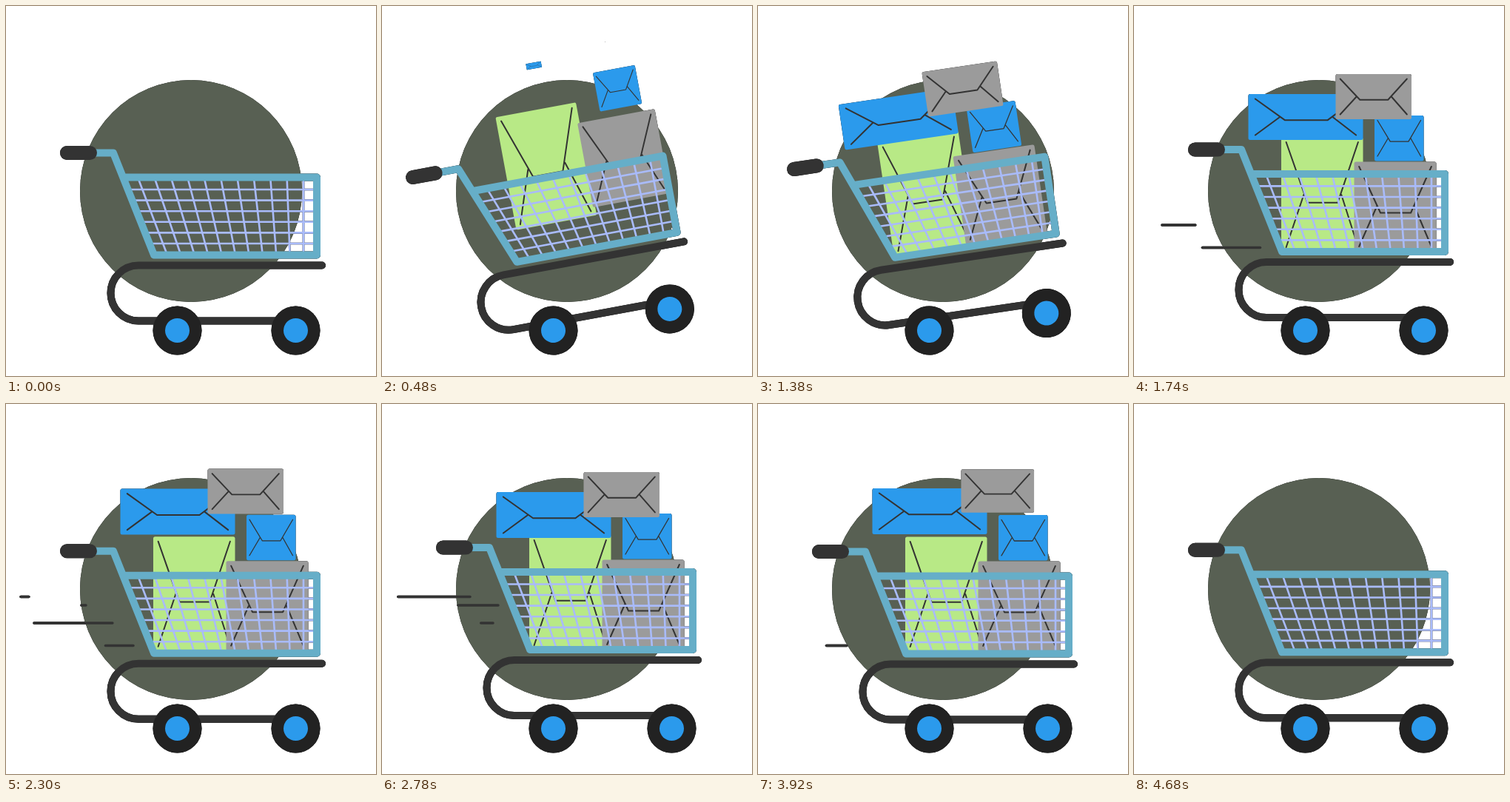
Animation, 500 px wide and 500 px high, one loop 4.7 s. Source, as an HTML page:

```html
<!DOCTYPE html>
<html lang="en">
<head>
<meta charset="utf-8">
<title>Shopping cart</title>
<style>
  html, body { margin: 0; width: 100%; height: 100%; overflow: hidden; background: #fff; }
  /* thin dark rim wherever the drawing meets the white page */
  svg { display: block; width: 100vw; height: 100vh; filter: drop-shadow(0 0 .5px #000); }
  path, line { fill: none; stroke-linecap: round; stroke-linejoin: round; }
  .dark { stroke: #333; }
  .grid { stroke: #a9bbfa; stroke-width: 2.6; stroke-linecap: butt; }
  .frame { stroke: #66aec8; stroke-width: 10; stroke-linecap: butt; }
  .tyre { fill: #222; }
  .hub { fill: #2b9aec; }
</style>
</head>
<body>
<svg viewBox="0 0 500 500">
  <circle cx="250" cy="250" r="150" fill="#586053"/>
  <g id="streaks"></g>
  <g id="cart">
    <g id="boxes"></g>
    <g id="body">
      <path class="grid" id="mesh"/>
      <path class="frame" d="M118 198.5H145L200 336.5H420V231.5H158"/>
      <path class="dark" stroke-width="19" d="M82.5 198.5H113.5"/>
      <path class="dark" stroke-width="10" d="M427 350.5H179a37.5 37.5 0 0 0 0 75H390"/>
    </g>
    <g id="wheels"></g>
  </g>
</svg>
<script>
const LOOP = 4700;
const BLUE = '#2b9aec', GREY = '#9b9b9b', GREEN = '#b8e986';
const $ = id => document.getElementById(id);
const ramp = (t, a, b) => Math.min(1, Math.max(0, (t - a) / (b - a)));
const ease = p => (1 - Math.cos(Math.PI * p)) / 2;
const hump = p => Math.sin(Math.PI * p);

function add(parent, tag, attrs) {
  const el = document.createElementNS('http://www.w3.org/2000/svg', tag);
  for (const k in attrs) el.setAttribute(k, attrs[k]);
  return parent.appendChild(el);
}

for (const cx of [231.5, 391.5]) {
  add($('wheels'), 'circle', { class: 'tyre', cx, cy: 438.5, r: 33 });
  add($('wheels'), 'circle', { class: 'hub', cx, cy: 438.5, r: 16.5 });
}

let mesh = '';
for (let i = 0; i < 11; i++) mesh += `M${179 + 22.3 * i} 234L${217 + 18.5 * i} 334`;
for (let y = 248; y < 330; y += 14.6) mesh += `M${145 + (y - 198.5) * .4} ${y}H416`;
$('mesh').setAttribute('d', mesh);

function makeBox({ x, y, w, h, fill, enter }, i) {
  const el = add($('boxes'), 'g', {});
  const at = (u, v) => `${(u - .5) * w} ${(v - .5) * h}`;
  const top = 6.5 / h;
  add(el, 'rect', { x: -w / 2, y: -h / 2, width: w, height: h, rx: 2.5, fill });
  add(el, 'path', {
    class: 'dark', 'stroke-width': Math.min(2, w * .019),
    d: `M${at(.06, top)}L${at(.32, .57)}L${at(.69, .57)}L${at(.94, top)}` +
       `M${at(.275, .5)}L${at(.06, 1 - top)}M${at(.735, .5)}L${at(.94, 1 - top)}`
  });
  // boxes in the basket ride with it, the ones on top bounce against it
  const bounce = y > 140 ? .35 : -.9;
  return { el, cx: x + w / 2, cy: y + h / 2, enter, leave: 4350 - 120 * i, bounce };
}

const boxes = [
  { x: 199, y: 177.5, w: 110.5, h: 155, fill: GREEN, enter: 5 },
  { x: 297.5, y: 210.5, w: 111, h: 121, fill: GREY, enter: 105 },
  { x: 325, y: 148, w: 66.5, h: 61.5, fill: BLUE, enter: 150 },
  { x: 154.5, y: 119, w: 155, h: 62, fill: BLUE, enter: 378 },
  { x: 272.5, y: 92, w: 102.5, h: 61, fill: GREY, enter: 460 }
].map(makeBox);

function drawBox(b, t, lift) {
  const q = ramp(t, b.enter, b.enter + 700);
  const scale = ease(ramp(q, 0, .62)) * (1 - ramp(t, b.leave, b.leave + 260) ** 2);
  // drift in from the right, hop, then drop
  const x = b.cx + 50 * (1 - q) ** 1.6;
  const y = b.cy - 52 * (1 - q ** 3.5) - 20 * hump(ramp(q, 0, .4)) + b.bounce * lift;
  b.el.style.display = scale > 0 ? '' : 'none';
  b.el.setAttribute('transform', `translate(${x} ${y}) scale(${scale})`);
}

const PASS = 440, GAP = 680, LAST = 4240;
const streaks = [
  { left: 38, right: 150, y: 296, start: 1389 },
  { left: 92.5, right: 172, y: 326.5, start: 1517 },
  { left: 20, right: 119, y: 260.5, start: 1885 },
  { left: 102, right: 157, y: 272, start: 1885 }
];
for (const s of streaks) {
  s.el = add($('streaks'), 'line', { class: 'dark', y1: s.y, y2: s.y, 'stroke-width': 3.5 });
}

function drawStreak({ el, left, right, start }, t) {
  const begin = start + Math.floor((t - start) / GAP) * GAP;
  const p = (t - begin) / PASS;
  const on = begin >= start && begin < LAST && p < 1;
  el.style.display = on ? '' : 'none';
  el.setAttribute('x1', right - (right - left) * ramp(p, 0, .5));
  el.setAttribute('x2', right - (right - left) * ramp(p, .5, 1));
}

function draw(t) {
  const tilt = -16.9 * (ease(ramp(t, 175, 705)) - ease(ramp(t, 1080, 1680)));
  const dip = 2 * hump(ramp(t, 175, 705));
  const shake = ramp(t, 1200, 1500);
  const bob = shake * (2.9 * Math.cos(2 * Math.PI * (t * 14 / LOOP - .73)) - 1.8);

  $('cart').setAttribute('transform', `rotate(${tilt} 231.5 438.5)`);
  $('boxes').setAttribute('transform', `translate(0 ${dip})`);
  $('body').setAttribute('transform', `translate(0 ${dip + bob})`);
  boxes.forEach(b => drawBox(b, t, bob + 4.6 * shake));
  streaks.forEach(s => drawStreak(s, t));
}

const t0 = performance.now();
function tick() {
  draw((performance.now() - t0) % LOOP);
  requestAnimationFrame(tick);
}
tick();
</script>
</body>
</html>
```
